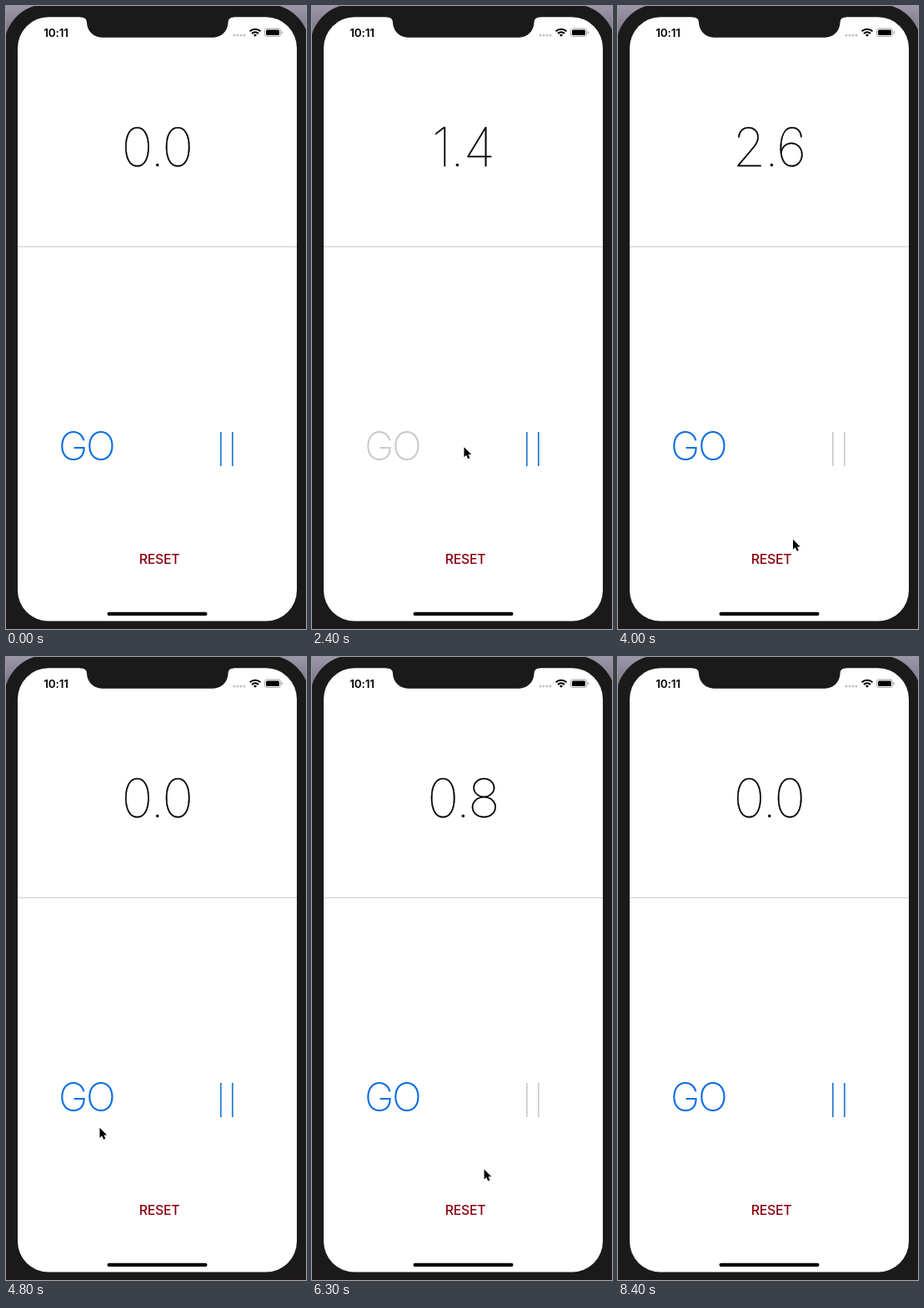
An HTML page for the animation above (8.6 s loop, 360 px wide and 746 px high).

```html
<!DOCTYPE html>
<html lang="en">
<head>
<meta charset="utf-8">
<title>Stopwatch</title>
<style>
  html, body { margin: 0; width: 100%; height: 100%; overflow: hidden; background: #1a1a1a; }
  svg { display: block; width: 360px; height: 746px; }
  text { font-family: Inter, Roboto, sans-serif; text-anchor: middle; }
  #count { font-size: 64px; font-weight: 100; letter-spacing: -1.5px; stroke: #000; stroke-width: .35px; }
  #go { font-size: 47.5px; font-weight: 200; }
</style>
</head>
<body>
<svg viewBox="0 0 360 746">
  <defs>
    <linearGradient id="desk" x1="0" y1="0" x2="0" y2="1">
      <stop offset="0" stop-color="#9c96aa"/>
      <stop offset=".05" stop-color="#77717f"/>
      <stop offset=".9" stop-color="#1c1a1b"/>
      <stop offset="1" stop-color="#1e1a1b"/>
    </linearGradient>
  </defs>

  <!-- phone body and screen -->
  <rect width="360" height="746" fill="url(#desk)"/>
  <rect x="-2" y="-2" width="366" height="752" rx="50" fill="#1a1a1a"/>
  <rect x="14" y="13.3" width="335" height="723.2" rx="37" fill="#fff"/>
  <path d="M89 12V13.3Q97 13.3 97 20A18 18 0 0 0 115 37.700H248.500A18 18 0 0 0 266.500 20Q266.500 13.3 274 13.3V12Z" fill="#1a1a1a"/>

  <!-- status bar -->
  <text x="60" y="36.500" font-size="13.500" font-weight="600" letter-spacing="-.2">10:11</text>
  <path d="M274 35H287" stroke="#c2c2c4" stroke-width="3" stroke-linecap="round" stroke-dasharray="0 4"/>
  <g fill="none" stroke="#000" stroke-width="2.100">
    <path d="M292.600 30.300A9.200 9.200 0 0 1 305.400 30.300"/>
    <path d="M295 33A5.800 5.800 0 0 1 303 33"/>
  </g>
  <path d="M296.900 34.700A3 3 0 0 1 301.100 34.700L299 36.800Z"/>
  <rect x="310.500" y="27" width="19" height="9.500" rx="2.600" fill="none" stroke="#999" stroke-width=".9"/>
  <rect x="312" y="28.400" width="16" height="6.700" rx="1.500"/>
  <path d="M330.700 30V33.500Q332 32.800 332 31.750T330.700 30Z" fill="#999"/>

  <!-- stopwatch -->
  <text id="count" x="181" y="191.500"></text>
  <rect x="14" y="287.500" width="335" height="1.500" fill="#d8d8d8"/>
  <text id="go" x="80.700 114" y="544">GO</text>
  <path id="pause" d="M257.800 510V551M271.800 510V551" stroke-width="1.700"/>
  <text x="184" y="668" font-size="15.800" font-weight="500" letter-spacing="-.3" fill="#8c0010">RESET</text>
  <rect x="121.500" y="725.800" width="120" height="4.200" rx="2.100"/>

  <path id="cursor" d="M0 0V12L2.700 9.500L4.700 14L6.900 13L5 8.700H8.700Z"
        stroke="#fff" stroke-width="1" paint-order="stroke" stroke-linejoin="round"/>
</svg>
<script>
  const LOOP = 8600, STEP = 100;
  const BLUE = '#0b6fe0', GREY = '#cacaca';
  const RATE = 1.2 / 1000; // counter seconds per millisecond
  const GO = [82.5, 528], PAUSE = [258.5, 528.5];
  const $ = id => document.getElementById(id);
  const count = $('count'), go = $('go'), pause = $('pause'), cursor = $('cursor');

  // When GO, pause and RESET are clicked
  const runs = [
    { start: 1235, stop: 3400, reset: 4300 },
    { start: 5165, stop: 5830, reset: 7000 }
  ];

  const SHOWN = 700, HIDDEN = 7500, ENTRY = [-10, 500];
  const moves = [
    { from: 700, to: 1050, spot: GO },
    { from: 2160, to: 2600, spot: PAUSE },
    { from: 3500, to: 4200, spot: [198, 666] },
    { from: 4500, to: 4950, spot: GO },
    { from: 5150, to: 5450, spot: PAUSE },
    { from: 6000, to: 6520, spot: [174, 667] },
    { from: 7050, to: 7300, spot: [184, 497] }
  ];

  function ease(t, from, to) {
    const k = Math.min(1, Math.max(0, (t - from) / (to - from)));
    return k * k * (3 - 2 * k);
  }

  function pointerAt(t) {
    return moves.reduce((pos, { from, to, spot }) => {
      const k = ease(t, from, to);
      return pos.map((v, i) => v + (spot[i] - v) * k);
    }, ENTRY);
  }

  function draw(t) {
    const run = runs.find(r => t >= r.start && t < r.reset);
    const running = run && t < run.stop;
    const value = run ? (Math.min(t, run.stop) - run.start) * RATE : 0;
    count.textContent = value.toFixed(1);
    go.setAttribute('fill', running ? GREY : BLUE);
    pause.setAttribute('stroke', run && !running ? GREY : '#2079cc');

    const [x, y] = pointerAt(t);
    cursor.setAttribute('transform', `translate(${x} ${y})`);
    cursor.setAttribute('visibility', t >= SHOWN && t < HIDDEN ? 'visible' : 'hidden');
  }

  const begin = performance.now();
  function tick() {
    const t = (performance.now() - begin) % LOOP;
    draw(Math.floor(t / STEP) * STEP);
    requestAnimationFrame(tick);
  }
  tick();
</script>
</body>
</html>
```
